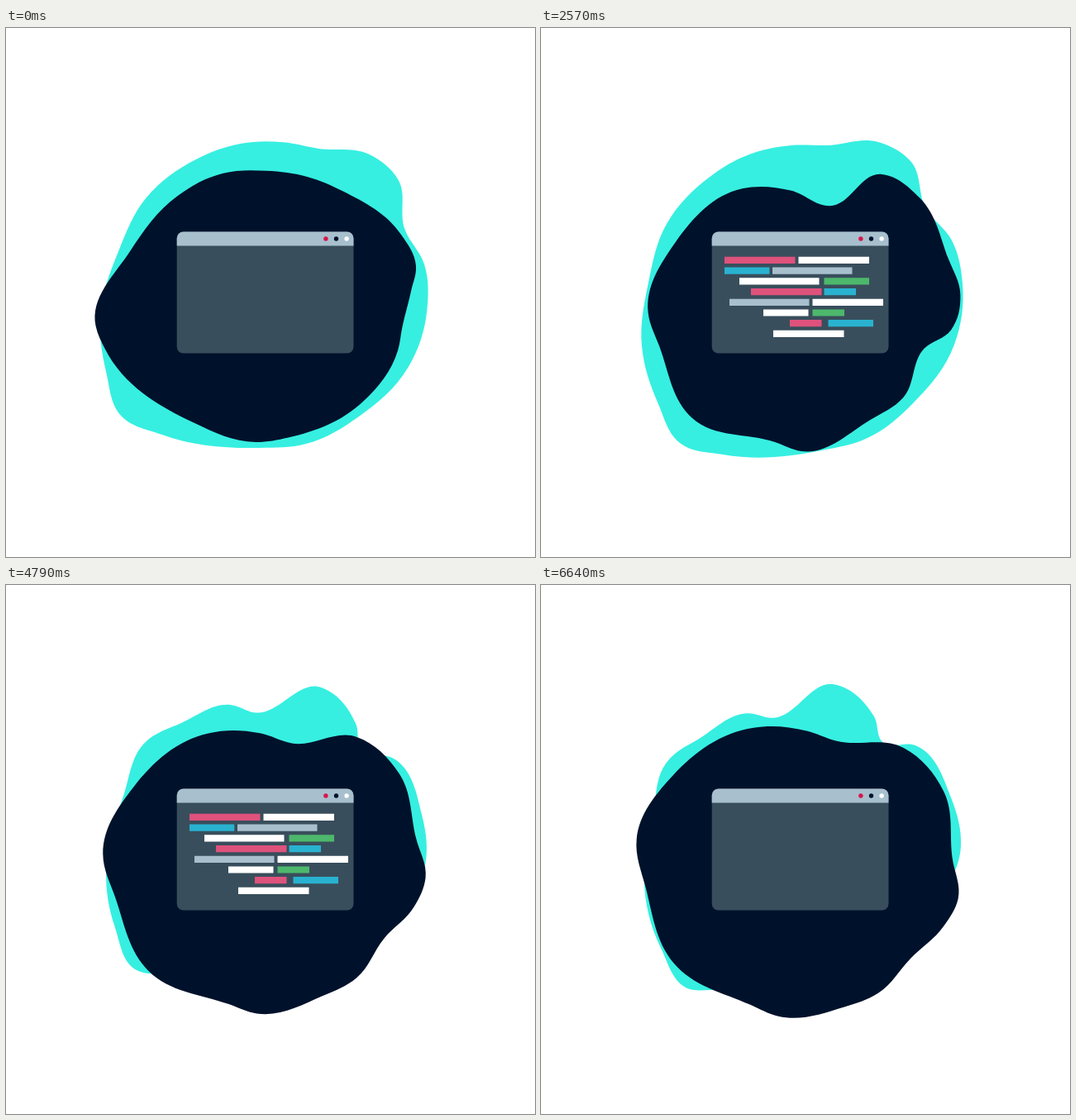
Animation of 640 by 640 pixels, one loop 6710 ms. Source, as an HTML page with a canvas:

```html
<!DOCTYPE html>
<html lang="en">
<head>
<meta charset="utf-8">
<title>Code window</title>
<style>
html, body { margin: 0; width: 100%; height: 100%; overflow: hidden; background: #fff; }
canvas { display: block; width: 100vmin; height: 100vmin; }
</style>
</head>
<body>
<canvas id="stage" width="640" height="640"></canvas>
<script>
const ctx = document.getElementById('stage').getContext('2d');
const LOOP = 6710, STEP = LOOP / 94;
const NAVY = '#00122b', CYAN = '#36efe1', GREY = '#a8bfce', PINK = '#de527c',
      BLUE = '#29b2d0', GREEN = '#4db86c', WHITE = '#fff';

const clamp = x => Math.min(1, Math.max(0, x));
const smooth = x => x * x * (3 - 2 * x);

// Poses are x,y pairs, clockwise from the kink at the top.
const lemon = [297,177, 349,185, 397,203, 435,229, 492,294, 502,336, 490,364, 470,405, 459,431,
  404,483, 307,506, 267,503, 200,465, 113,354, 108,325, 168,245, 238,192];
const wide = [274,146, 303,137, 400,156, 469,210, 489,289, 508,339, 500,367, 468,437, 436,476,
  400,501, 333,519, 293,516, 190,484, 128,407, 97,338, 118,254, 205,166];
const pinched = [311,199, 357,221, 422,186, 466,217, 496,292, 508,337, 494,379, 460,399, 431,457,
  390,481, 304,514, 273,501, 175,466, 141,377, 130,335, 168,253, 253,193];
const full = [303,142, 345,142, 408,138, 447,161, 466,219, 497,257, 510,310, 500,383, 452,452,
  395,496, 340,511, 220,516, 168,502, 142,455, 122,385, 130,308, 152,237, 203,181, 252,153];
const notched = [301,137, 326,150, 412,133, 446,183, 448,217, 483,230, 508,305, 503,363, 441,434,
  378,489, 298,504, 220,464, 165,446, 139,437, 120,380, 123,297, 155,225, 190,166, 238,149];

// Each blob turns steadily (degrees per second) while easing from pose to pose.
const front = {
  color: NAVY, center: [275, 340], spin: 3.4, level: 3600,
  keys: [[0, lemon], [1080, wide], [2500, pinched], [3600, wide], [5700, pinched], [7500, wide]]
};
const back = {
  color: CYAN, center: [340, 322], spin: -4, level: 2570,
  keys: [[0, full], [1300, notched], [2570, full], [4400, notched], [LOOP, notched]]
};

function outline({ keys, center: [cx, cy], spin, level }, t) {
  const next = keys.findIndex(([time]) => time > t);
  const [t0, a] = keys[next - 1], [t1, b] = keys[next];
  const m = smooth((t - t0) / (t1 - t0));
  const turn = (t - level) / 1000 * spin * Math.PI / 180;
  const cos = Math.cos(turn), sin = Math.sin(turn);
  const points = [];
  for (let i = 0; i < a.length; i += 2) {
    const x = a[i] + (b[i] - a[i]) * m - cx;
    const y = a[i + 1] + (b[i + 1] - a[i + 1]) * m - cy;
    points.push([cx + x * cos - y * sin, cy + x * sin + y * cos]);
  }
  return points;
}

function drawBlob(blob, t) {
  const points = outline(blob, t), n = points.length;
  const edges = points.map(([x, y], i) => {
    const [u, v] = points[(i + 1) % n], len = Math.hypot(u - x, v - y);
    return { len, dx: (u - x) / len, dy: (v - y) / len };
  });
  // The shorter neighbour edge weighs more in the tangent.
  const tangents = edges.map((e, i) => {
    const p = edges[(i + n - 1) % n];
    const x = p.dx * e.len + e.dx * p.len, y = p.dy * e.len + e.dy * p.len;
    const d = Math.hypot(x, y) || 1;
    return [x / d, y / d];
  });
  ctx.beginPath();
  ctx.moveTo(...points[0]);
  points.forEach(([x, y], i) => {
    const j = (i + 1) % n, [u, v] = points[j], [ax, ay] = tangents[i], [bx, by] = tangents[j];
    const h = edges[i].len * 0.35;
    ctx.bezierCurveTo(x + ax * h, y + ay * h, u - bx * h, v - by * h, u, v);
  });
  ctx.fillStyle = blob.color;
  ctx.fill();
}

// One entry per line: left, width, colour, start of typing.
const S = 38.5, M = 54.5, L = 85.5, XL = 96.5;
const lines = [
  [[222, L, PINK, 1510], [311.5, L, WHITE, 1203]],
  [[222, M, BLUE, 775], [280, XL, GREY, 1054]],
  [[240, XL, WHITE, 1465], [342.5, M, GREEN, 1245]],
  [[254, L, PINK, 900], [342.5, S, BLUE, 1203]],
  [[228, XL, GREY, 1465], [328.5, L, WHITE, 1530]],
  [[269, M, WHITE, 1550], [328.5, S, GREEN, 1293]],
  [[301, S, PINK, 1300], [347.5, M, BLUE, 1152]],
  [[281, L, WHITE, 1152]]
];
const TYPE_MS = 1000, HOLD = 3945;

function box(x, y, w, h, color, radii = 0) {
  ctx.beginPath();
  ctx.roundRect(x, y, w, h, radii);
  ctx.fillStyle = color;
  ctx.fill();
}

function drawWindow(t) {
  box(206.7, 246.5, 213.8, 147, '#394e5c', 8);
  box(206.7, 246.5, 213.8, 17, GREY, [8, 8, 0, 0]);
  ['#d8154a', NAVY, WHITE].forEach((color, i) =>
    box(384.2 + i * 12.6, 252.3, 5.4, 5.4, color, 2.7));
  const quarter = ms => clamp(ms / TYPE_MS) * Math.PI / 2;
  lines.forEach((line, row) => {
    for (const [x, w, color, start] of line) {
      const shown = Math.sin(quarter(t - start)) + Math.cos(quarter(t - start - HOLD)) - 1;
      if (shown > 0.001) box(x, 276.8 + row * 12.72, w * shown, 8.2, color);
    }
  });
}

function draw(t) {
  ctx.fillStyle = WHITE;
  ctx.fillRect(0, 0, 640, 640);
  drawBlob(back, t);
  drawBlob(front, t);
  drawWindow(t);
}

const origin = performance.now();
function tick() {
  const t = (performance.now() - origin) % LOOP;
  draw(Math.floor((t + 5) / STEP) % 94 * STEP);
  requestAnimationFrame(tick);
}
tick();
</script>
</body>
</html>
```
